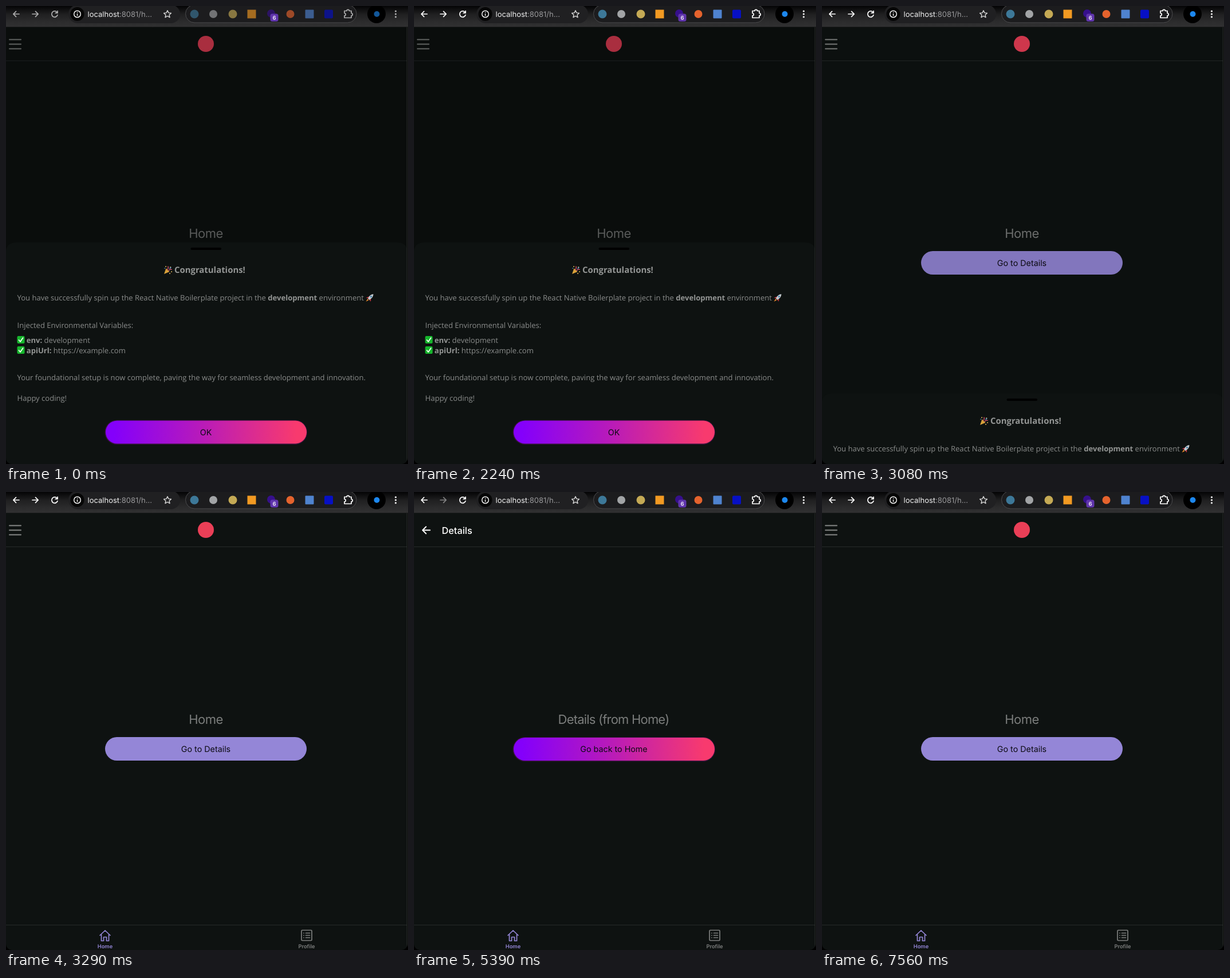
Write an HTML page that moves like this. It is 702 px wide and 798 px high and loops after 8 s.

```html
<!DOCTYPE html>
<html lang="en">
<head>
<meta charset="utf-8">
<title>App walkthrough</title>
<style>
  html, body { margin: 0; width: 100%; height: 100%; overflow: hidden; background: #000; }
  svg { display: block; width: 702px; height: 798px; }
  text { text-rendering: geometricPrecision; }
  .ui { font-family: Inter, Roboto, sans-serif; }
  .copy { font: 13.05px "Open Sans", "Noto Sans", sans-serif; fill: #8a8c8b; }
  .copy .strong { font-weight: 700; fill: #939594; }
  .heading { font-size: 22px; fill: #7b7d7c; }
  .label { font-size: 14.3px; fill: #0c0b12; }
  .tab { font-size: 9.3px; font-weight: 600; }
  .mid { text-anchor: middle; }
  .line { fill: none; stroke-linecap: round; stroke-linejoin: round; }

  .tools, .forward, .sheet, .backdrop, .details {
    animation: 8s step-end infinite;
  }
  .tools { animation-name: wake; }
  .forward { animation-name: forward; }
  .sheet { animation-name: slide; }
  .backdrop { animation-name: clear; }
  .details { animation-name: details; }

  @keyframes wake {
    0% { opacity: .65; }
    27.125% { opacity: .82; }
    28%, 100% { opacity: 1; }
  }
  @keyframes forward {
    0% { opacity: 1; }
    67.375% { opacity: .45; }
    93.625%, 100% { opacity: 1; }
  }
  /* exponential ease-out, sampled at the 70 ms picture rate */
  @keyframes slide {
    0% { transform: translateY(0); }
    38.5% { transform: translateY(263px); }
    39.375% { transform: translateY(368px); }
    40.25% { transform: translateY(384px); }
    41.125%, 100% { transform: translateY(400px); }
  }
  @keyframes clear {
    0% { opacity: .28; }
    38.5% { opacity: .12; }
    39.375% { opacity: .015; }
    40.25%, 100% { opacity: 0; }
  }
  @keyframes details {
    0% { opacity: 0; }
    67.375% { opacity: 1; }
    93.625%, 100% { opacity: 0; }
  }
</style>
</head>
<body>
<svg viewBox="0 0 702 798" class="ui">
  <defs>
    <linearGradient id="bar" x2="0" y2="1">
      <stop stop-color="#040405"/>
      <stop offset=".4" stop-color="#202021"/>
      <stop offset=".75" stop-color="#2c2c2d"/>
      <stop offset="1" stop-color="#313132"/>
    </linearGradient>
    <linearGradient id="neon">
      <stop offset=".04" stop-color="#8400fb"/>
      <stop offset=".5" stop-color="#bb1cb6"/>
      <stop offset=".95" stop-color="#f83a6e"/>
    </linearGradient>
    <clipPath id="window"><rect y="-20" width="701" height="818" rx="10"/></clipPath>
    <g id="neonButton">
      <rect x="172.500" y="427" width="353.500" height="42.500" rx="21" fill="#4b1450" opacity=".7"/>
      <rect x="174" y="428" width="351" height="40" rx="20" fill="url(#neon)"/>
    </g>
    <g id="check">
      <rect width="13" height="13" rx="2" fill="#16b52c"/>
      <path class="line" d="M3 7l2.500 2.800L10 3.200" stroke="#f4fff4" stroke-width="1.800"/>
    </g>
  </defs>

  <rect width="702" height="798" fill="#000"/>
  <g clip-path="url(#window)">
    <rect width="701" height="798" fill="#0e1211"/>

    <!-- home screen -->
    <g class="line" stroke="#858786" stroke-width="2">
      <path d="M6 58.500h20M6 66.500h20M6 74.500h20"/>
    </g>
    <circle cx="349" cy="66" r="14" fill="#ea3f57"/>
    <path d="M0 95.500h701M0 754.500h701" stroke="#262a29"/>
    <text class="heading mid" x="349" y="404" letter-spacing="-.5">Home</text>
    <rect x="173" y="427" width="352" height="41" rx="20.500" fill="#9486d7"/>
    <text class="label mid" x="349" y="453">Go to Details</text>

    <g class="line" stroke="#9486d7" stroke-width="1.700">
      <path d="M164 772.500l9-8.500 9 8.500M166.500 771v11h4v-6.500h5v6.500h4v-11"/>
    </g>
    <text class="tab mid" x="173" y="794.500" fill="#9486d7">Home</text>
    <g class="line" stroke="#7c7e7d" stroke-width="1.700">
      <rect x="516" y="763.500" width="18" height="18" rx="1.500"/>
      <path d="M523.500 768.500h7M523.500 772.500h7M523.500 776.500h7M519.800 768.500h.2M519.800 772.500h.2M519.800 776.500h.2"/>
    </g>
    <text class="tab mid" x="525" y="794.500" fill="#7c7e7d">Profile</text>

    <!-- details screen -->
    <g class="details">
      <rect y="37" width="701" height="58" fill="#0e1211"/>
      <rect y="96" width="701" height="658" fill="#0e1211"/>
      <path class="line" d="M28 66.500H15.500M21 60.500l-6 6 6 6" stroke="#fff" stroke-width="2"/>
      <text x="48.500" y="72.500" font-size="16.300" font-weight="500" fill="#fff">Details</text>
      <text class="heading mid" x="348.500" y="404" letter-spacing="-.8">Details (from Home)</text>
      <use href="#neonButton"/>
      <text class="label mid" x="349" y="453">Go back to Home</text>
    </g>

    <rect class="backdrop" y="37" width="701" height="761"/>

    <!-- bottom sheet -->
    <g class="sheet">
      <path d="M0 820V426Q2 412 18 412H683Q699 412 701 426V820z" fill="#0e1211"/>
      <rect x="322.500" y="421" width="53.500" height="4" rx="2" fill="#000"/>

      <g transform="translate(275 452)">
        <path d="M4.500 5L10.500 11 1 15z" fill="#d9a13a"/>
        <path class="line" d="M7 7q2-2 1-5M9 9q2-3 5-2" stroke="#c9506b" stroke-width="1.500"/>
        <path class="line" d="M4 2h.2M12 3h.2M14 11h.2M11 14h.2" stroke="#d8b25a" stroke-width="1.800"/>
        <path class="line" d="M2 5h.2M11 5.500l2-2" stroke="#5b9bd0" stroke-width="1.500"/>
      </g>
      <g class="copy">
        <text class="strong" x="294" y="465" font-size="14.900">Congratulations!</text>
        <text x="19.500" y="513">You have successfully spin up the React Native Boilerplate project in the <tspan class="strong">development</tspan> environment</text>
        <text x="19.500" y="561">Injected Environmental Variables:</text>
        <text x="35.800" y="587"><tspan class="strong">env:</tspan> development</text>
        <text x="35.800" y="605"><tspan class="strong">apiUrl:</tspan> https://example.com</text>
        <text x="19.500" y="652">Your foundational setup is now complete, paving the way for seamless development and innovation.</text>
        <text x="19.500" y="688">Happy coding!</text>
      </g>
      <use href="#check" x="19.500" y="575"/>
      <use href="#check" x="19.500" y="593"/>
      <g transform="translate(628.500 502)">
        <path d="M3 5L7 4 9 10 8 13 6 10 3 7 0 7z" fill="#b83440"/>
        <path d="M13 0Q7 0 3.500 7.500L6 10Q13 6 13 0z" fill="#c3cad0"/>
        <circle cx="9" cy="4.200" r="1.500" fill="#3d7ba8"/>
        <path d="M3 8L5 10.500 0 13z" fill="#e58a2c"/>
      </g>
      <use href="#neonButton" y="294.500"/>
      <text class="label mid" x="349" y="747.500">OK</text>
    </g>

    <path d="M700.500 37V798" stroke="#303332"/>
  </g>

  <!-- browser bar -->
  <rect width="702" height="37" fill="url(#bar)"/>
  <path d="M0 36.500h702" stroke="#1b1c1c"/>
  <rect x="109" y="-2" width="195" height="32" rx="16" fill="#202022"/>
  <circle cx="124.500" cy="14" r="12" fill="#050505"/>
  <g class="line" stroke="#f2f2f2" stroke-width="1.500">
    <circle cx="124.500" cy="14" r="5.800"/>
    <path d="M124.500 13.800v3M124.500 11.100v.1"/>
  </g>
  <text x="142.500" y="18.500" font-size="13" fill="#f1f1f1">localhost<tspan fill="#99999b">:8081/h...</tspan></text>
  <path class="line" d="M282 7.800l1.900 4.100 4.500.5-3.400 3 1 4.400-4-2.300-4 2.300 1-4.400-3.400-3 4.500-.5z" stroke="#dcdcdc" stroke-width="1.400"/>
  <rect x="313.500" y="-2" width="298.500" height="31" rx="15.500" fill="#1c1c1e" stroke="#4b4b4d"/>
  <circle cx="647" cy="14" r="16" fill="#000"/>

  <g class="tools">
    <g class="line" stroke="#fff" stroke-width="1.700">
      <path d="M23 14H13M17.500 9.300L12.800 14l4.700 4.700"/>
      <path class="forward" d="M46 14h10M51.500 9.300l4.700 4.700-4.700 4.700"/>
      <path d="M89.300 11.200A5.200 5.200 0 1 0 90 15.500M90 8.500v3.700h-3.700"/>
      <path d="M591 8.500h4a2.200 2.200 0 0 1 4.400 0h3.600v4a2.200 2.200 0 0 1 0 4.400V20.500h-12v-3.600a2.200 2.200 0 0 0 0-4.400z"/>
    </g>
    <circle cx="329" cy="14" r="7.500" fill="#3d7898"/>
    <circle cx="362" cy="14" r="7" fill="#a2a4a6"/>
    <circle cx="396" cy="14" r="7.500" fill="#c5aa55"/>
    <rect x="421.500" y="6.500" width="15" height="15" fill="#f29a22"/>
    <circle cx="463" cy="13" r="7" fill="#36108c"/>
    <circle cx="496.500" cy="14" r="7" fill="#e5632d"/>
    <rect x="522.500" y="6.500" width="15" height="15" rx="1" fill="#4f83cf"/>
    <rect x="556" y="6.500" width="15" height="15" rx="2" fill="#0710c4"/>
    <circle cx="647.500" cy="14" r="5" fill="#1c87ee"/>
    <g fill="#fff">
      <circle cx="680.500" cy="9" r="1.600"/>
      <circle cx="680.500" cy="14" r="1.600"/>
      <circle cx="680.500" cy="19" r="1.600"/>
    </g>
  </g>
  <rect x="461.500" y="13.500" width="14" height="13.500" rx="3.500" fill="#6035ac"/>
  <text class="mid" x="468.500" y="23.800" font-size="9.500" font-weight="600" fill="#f4f0fa">6</text>
</svg>
</body>
</html>
```
